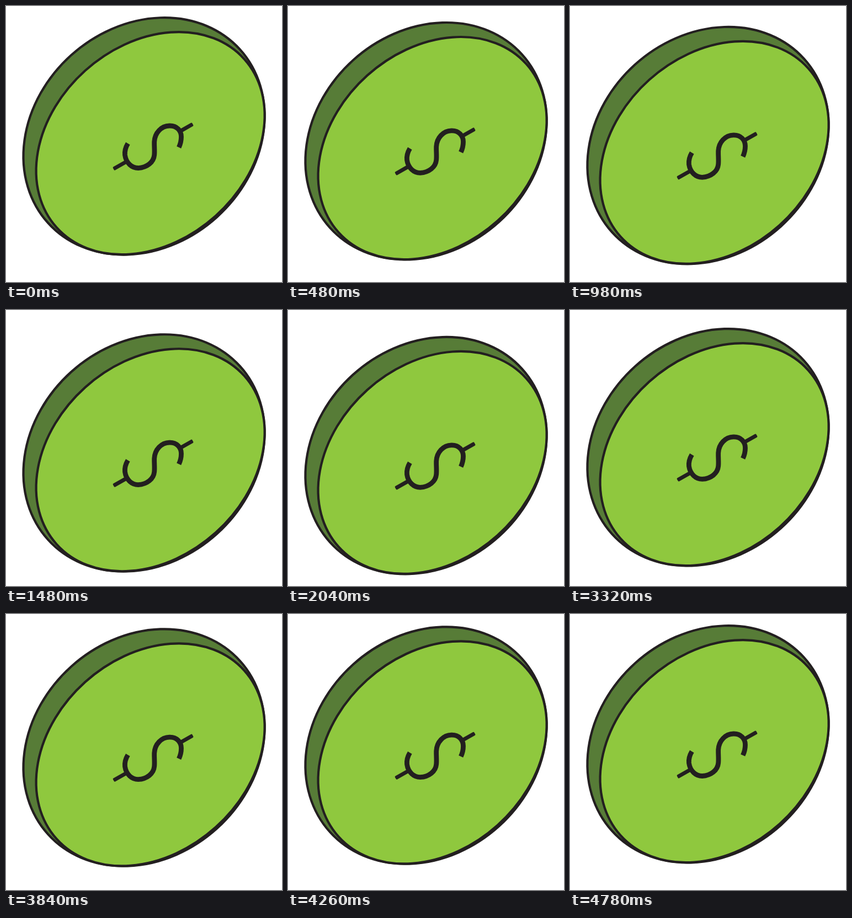
Animation, 500 px wide and 500 px high, one loop 4.8 s. Source, as an HTML page with a canvas:

```html
<!DOCTYPE html>
<html lang="en">
<head>
<meta charset="utf-8">
<title>Floating coin</title>
<style>
  html, body { margin: 0; width: 100%; height: 100%; overflow: hidden; background: #fff; }
  canvas { display: block; }
</style>
</head>
<body>
<canvas id="stage" width="500" height="500"></canvas>
<script>
const ctx = document.getElementById('stage').getContext('2d');
const LOOP = 4800;
const TRAVEL = 28.9;
const INK = '#231f20';
const FACE = '#8fc83e';
const EDGE = '#577c37';
const RAD = Math.PI / 180;

const curl = new Path2D(
  'M220.8 249 C217.5 254.5 214.8 263 215.5 270 C217.5 284.5 228 293.5 239.5 293.5 ' +
  'C255.5 292.5 267.5 283 268.7 270 C269.5 262 268.5 256 268.7 246 ' +
  'C269.5 229.5 281.5 217.3 296 217 C309.5 216.5 317.5 226 317.5 237 C317.5 244 316 250 313.2 256');

// cubic-bezier(0, 0, .58, 1), solved for its parameter by bisection
function easeOut(x) {
  let low = 0, high = 1;
  for (let i = 0; i < 30; i++) {
    const s = (low + high) / 2;
    if (1.74 * s * s - 0.74 * s ** 3 < x) low = s; else high = s;
  }
  return low * low * (3 - 2 * low);
}

function offsetAt(time) {
  const phase = (time % LOOP) / (LOOP / 2);
  return TRAVEL * (phase < 1 ? easeOut(phase) : 1 - easeOut(phase - 1));
}

// Tilted ellipse given by its half extents and the sideways lean of its top point
function disc(x, y, halfWidth, halfHeight, lean, fill) {
  const skew = lean * halfHeight;
  const mean = (halfWidth ** 2 + halfHeight ** 2) / 2;
  const half = (halfWidth ** 2 - halfHeight ** 2) / 2;
  const spread = Math.hypot(half, skew);
  ctx.beginPath();
  ctx.ellipse(x, y, Math.sqrt(mean + spread), Math.sqrt(mean - spread),
    -Math.atan2(skew, half) / 2, 0, Math.PI * 2);
  ctx.fillStyle = fill;
  ctx.fill();
  ctx.lineWidth = 4.2;
  ctx.stroke();
}

function bar(x, y, length) {
  ctx.save();
  ctx.translate(x, y);
  ctx.rotate(-29.5 * RAD);
  ctx.beginPath();
  ctx.roundRect(-length / 2, -3.5, length, 7, 1.8);
  ctx.fillStyle = INK;
  ctx.fill();
  ctx.restore();
}

function draw(time) {
  ctx.fillStyle = '#fff';
  ctx.fillRect(0, 0, 500, 500);
  ctx.save();
  ctx.translate(0, offsetAt(time));
  ctx.strokeStyle = INK;
  disc(250, 235.8, 218.5, 214.7, 37, EDGE);
  disc(261.6, 248.6, 207, 201.5, 51.5, FACE);
  bar(206.5, 288.5, 27);
  bar(327, 220.3, 26);
  ctx.lineWidth = 8.8;
  ctx.stroke(curl);
  ctx.restore();
}

function tick() {
  draw(performance.now());
  requestAnimationFrame(tick);
}
tick();
</script>
</body>
</html>
```
